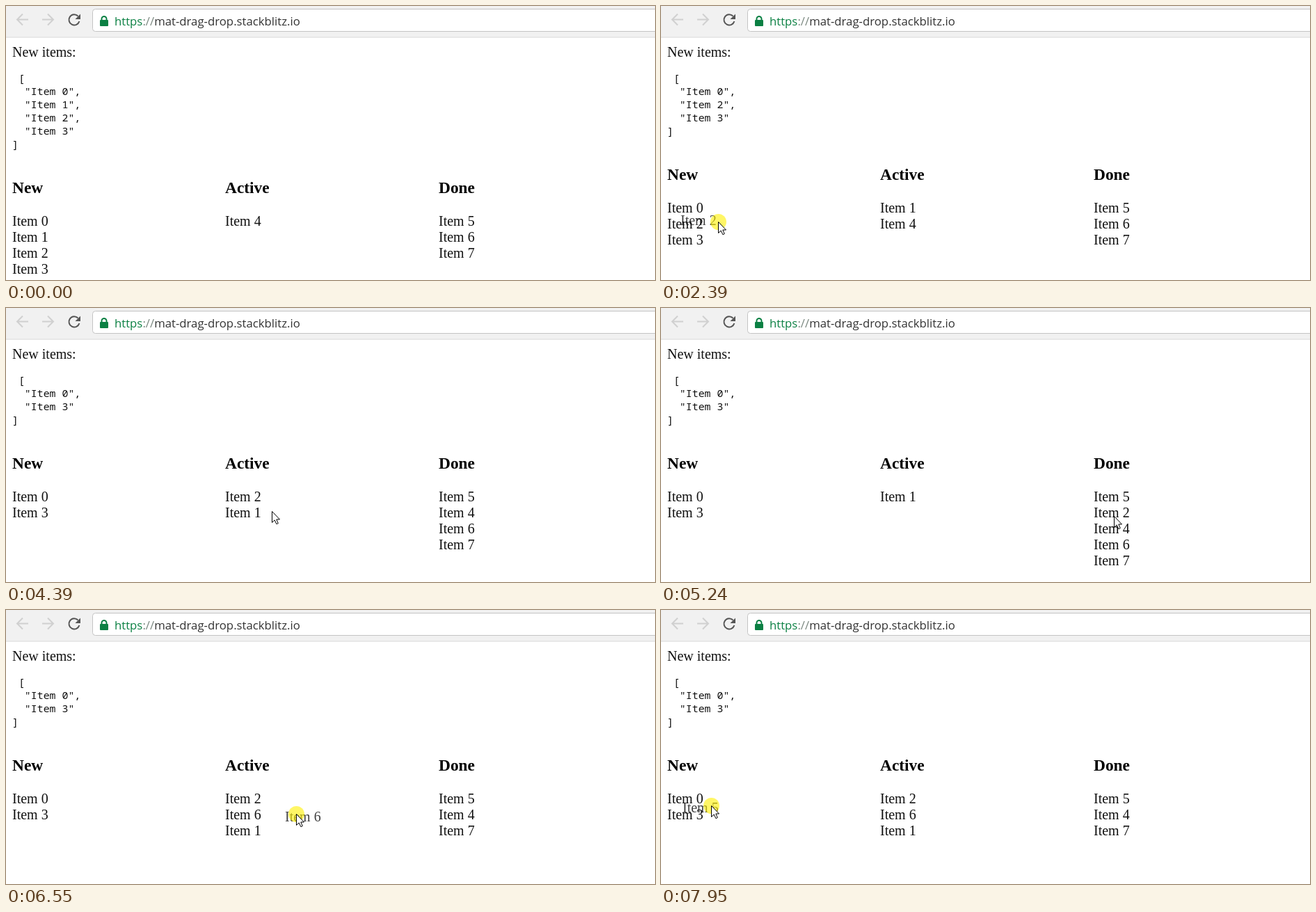
An HTML page for the animation above (8 s loop, 933 by 394 pixels).

```html
<!DOCTYPE html>
<html lang="en">
<head>
<meta charset="utf-8">
<title>Drag and drop lists</title>
<style>
  html, body { margin: 0; width: 100%; height: 100%; overflow: hidden; background: #fff; }
  svg { display: block; width: 933px; height: 394px; }
  text { white-space: pre; }
  .page { font: 20px "Liberation Serif", "Times New Roman", serif; fill: #111; }
  .head { font-size: 23.4px; font-weight: bold; fill: #000; }
  .code { font: 14.9px "Noto Sans Mono", "DejaVu Sans Mono", monospace; }
  .url { font: 16.75px "Open Sans", "Noto Sans", sans-serif; fill: #333; }
  .icon { fill: none; stroke-width: 2; }
</style>
</head>
<body>
<svg viewBox="0 0 933 394">
  <rect width="933" height="44.500" fill="#f1f1f1"/>
  <rect y="44.500" width="933" height="1" fill="#d5d5d5"/>
  <rect x="124.500" y="4.500" width="830" height="32" rx="4" fill="#fff" stroke="#c4c4c4"/>
  <g class="icon" stroke="#d0d0d0">
    <path d="M32 19.500H16M24 11.500l-8 8l8 8"/>
    <path d="M52 19.500H68M60 11.500l8 8l-8 8"/>
  </g>
  <path class="icon" stroke="#555" d="M103.500 14.500A7.600 7.600 0 1 0 105.400 22"/>
  <path fill="#555" d="M107 11.500V19h-7.500z"/>
  <rect x="135" y="20" width="12" height="9" rx="1" fill="#0b8043"/>
  <path class="icon" stroke="#0b8043" d="M137.500 20.500v-2a3.500 3.500 0 0 1 7 0v2"/>
  <text class="url" x="156" y="28"><tspan fill="#0b8043">https</tspan><tspan fill="#7d8a82">://</tspan>mat-drag-drop.stackblitz.io</text>

  <g class="page">
    <text x="9" y="73">New items:</text>
    <g class="code" id="json"></g>
    <g id="lists"></g>
    <text id="preview" opacity=".8"></text>
  </g>
  <g id="pointer">
    <circle id="press" cx=".5" cy=".5" r="11.500" fill="#fff000" fill-opacity=".6"/>
    <path d="M.5 .5V16.500L4.200 13L6.900 18.700L9.300 17.600L6.800 12H11.500Z" fill="#fff" stroke="#000"/>
  </g>
</svg>
<script>
const LOOP = 8000, START = 380, STEP = 77.25, SLACK = 12;
const ROW = 23, CODE_ROW = 19;
const columns = [["New", 9], ["Active", 315], ["Done", 622]];
const initial = [[0, 1, 2, 3], [4], [5, 6, 7]];

// grip: pointer relative to the item's baseline start
// hops: time, column, index of the placeholder
// via: time, x, y of the pointer on its way; end: where the item is released
const moves = [
  { item: 1, press: 680, drop: 1690, grip: [42, -8], hops: [[840, 0, 0], [1390, 1, 0]],
    via: [[1150, 176, 316], [1550, 362, 305]], end: [362, 305] },
  { item: 2, press: 2310, drop: 2920, grip: [54, -5], hops: [[2780, 1, 0]],
    via: [[2390, 82, 310]], end: [352, 291] },
  { item: 4, press: 3470, drop: 3850, grip: [31, -6], hops: [[3770, 2, 1]],
    via: [[3240, 352, 294]], end: [649, 297] },
  { item: 2, press: 4470, drop: 5160, grip: [29, -2], hops: [[4620, 1, 1], [5000, 2, 1]],
    via: [[4390, 386, 292], [4850, 560, 296]], end: [651, 299] },
  { item: 2, press: 5390, drop: 5850, grip: [29, -2], hops: [[5540, 1, 0]],
    via: [], end: [362, 284] },
  { item: 6, press: 6320, drop: 6700, grip: [16, -11], hops: [[6480, 1, 1]],
    via: [[6550, 421, 293]], end: [384, 292] },
  { item: 5, press: 7250, drop: 7960, grip: [41, -10], hops: [],
    via: [[7010, 673, 273], [7411, 618, 201], [7580, 460, 162], [7796, 198, 244], [7873, 125, 291]],
    end: [71, 281] }
];

const $ = id => document.getElementById(id);
const label = (x, y, s, cls = "") => `<text x="${x}" y="${y}" class="${cls}">${s}</text>`;

// Lists at time t; with `dropped`, only finished moves count
function listsAt(t, dropped) {
  let lists = initial;
  for (const m of moves) {
    if (dropped && m.drop > t) break;
    for (const [at, col, index] of m.hops) {
      if (at > t) break;
      lists = lists.map(l => l.filter(d => d !== m.item));
      lists[col].splice(index, 0, m.item);
    }
  }
  return lists;
}

const savedAt = t => listsAt(t, true)[0];
const shiftFor = saved => (saved.length - 4) * CODE_ROW;
const baseline = (row, shift) => 316 + shift + row * ROW;

function pressPoint({ item, press, grip }) {
  const lists = listsAt(press), col = lists.findIndex(l => l.includes(item));
  const y = baseline(lists[col].indexOf(item), shiftFor(savedAt(press)));
  return [press, columns[col][1] + grip[0], y + grip[1]];
}

const path = [
  [START, 262, 380],
  ...moves.flatMap(m => [pressPoint(m), ...m.via, [m.drop, ...m.end]])
].sort((a, b) => a[0] - b[0]);

const slope = (i, k) => (path[i + 1][k] - path[i][k]) / (path[i + 1][0] - path[i][0]);

// Tangent that never overshoots
function tangent(i, k) {
  if (i === 0 || i === path.length - 1) return 0;
  const a = slope(i - 1, k), b = slope(i, k);
  return a * b <= 0 ? 0 : 2 * a * b / (a + b);
}

function along(t, k) {
  const i = Math.max(0, path.findLastIndex(p => p[0] <= t));
  if (i === path.length - 1) return path[i][k];
  const h = path[i + 1][0] - path[i][0], u = Math.max(0, (t - path[i][0]) / h), v = 1 - u;
  return v * v * (1 + 2 * u) * path[i][k] + u * u * (3 - 2 * u) * path[i + 1][k]
    + h * u * v * (v * tangent(i, k) - u * tangent(i + 1, k));
}

function drawLists(t) {
  const saved = savedAt(t), lists = listsAt(t), shift = shiftFor(saved);
  const names = saved.map(d => `  "Item ${d}"`).join(",\n").split("\n");
  $("json").innerHTML = [" [", ...names, "]"]
    .map((s, i) => label(9, 109 + i * CODE_ROW, s)).join("");
  $("lists").innerHTML = columns.map(([name, x], c) =>
    label(x, 269 + shift, name, "head") +
    lists[c].map((d, i) => label(x, baseline(i, shift), "Item " + d)).join("")
  ).join("");
}

function drawPointer(t) {
  const x = Math.round(along(t, 1)), y = Math.round(along(t, 2));
  const move = moves.find(m => t >= m.press && t < m.drop);
  const preview = $("preview");
  $("pointer").setAttribute("visibility", t < START ? "hidden" : "visible");
  $("pointer").setAttribute("transform", `translate(${x} ${y})`);
  $("press").style.display = move ? "" : "none";
  preview.textContent = move ? "Item " + move.item : "";
  if (move) {
    preview.setAttribute("x", x - move.grip[0]);
    preview.setAttribute("y", y - move.grip[1]);
  }
}

// The screen refreshes in even steps after an initial rest
let shown;
function frame() {
  const now = performance.now() % LOOP;
  const step = Math.max(-1, Math.floor((now - START + SLACK) / STEP));
  if (step !== shown) {
    shown = step;
    const t = START + step * STEP;
    drawLists(t);
    drawPointer(t);
  }
  requestAnimationFrame(frame);
}
frame();
</script>
</body>
</html>
```
